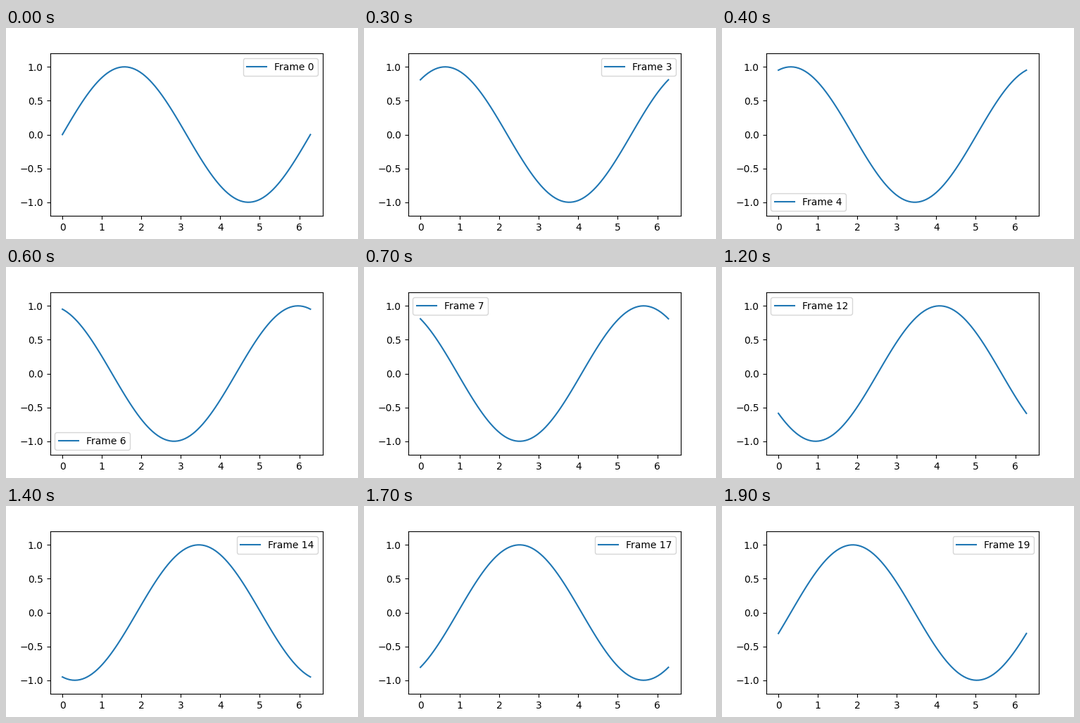
Animation of 500 by 300 pixels, one loop 2 s. Source, as a matplotlib script:

```python
import numpy as np
import matplotlib.pyplot as plt
from matplotlib.animation import FuncAnimation

FRAMES = 20
INTERVAL = 100

x = np.linspace(0, 2 * np.pi, 100)

fig, ax = plt.subplots(figsize=(5, 3), dpi=100)
line, = ax.plot(x, np.sin(x))
ax.set_ylim(-1.2, 1.2)


def update(i):
    line.set_ydata(np.sin(x + 2 * np.pi * i / FRAMES))
    line.set_label(f"Frame {i}")
    # A new legend each time moves to the corner the wave leaves free.
    legend = ax.legend(loc="best")
    return line, legend


anim = FuncAnimation(fig, update, frames=FRAMES, init_func=lambda: update(0),
                     interval=INTERVAL, repeat=True, repeat_delay=0, blit=False)
plt.show()
```
